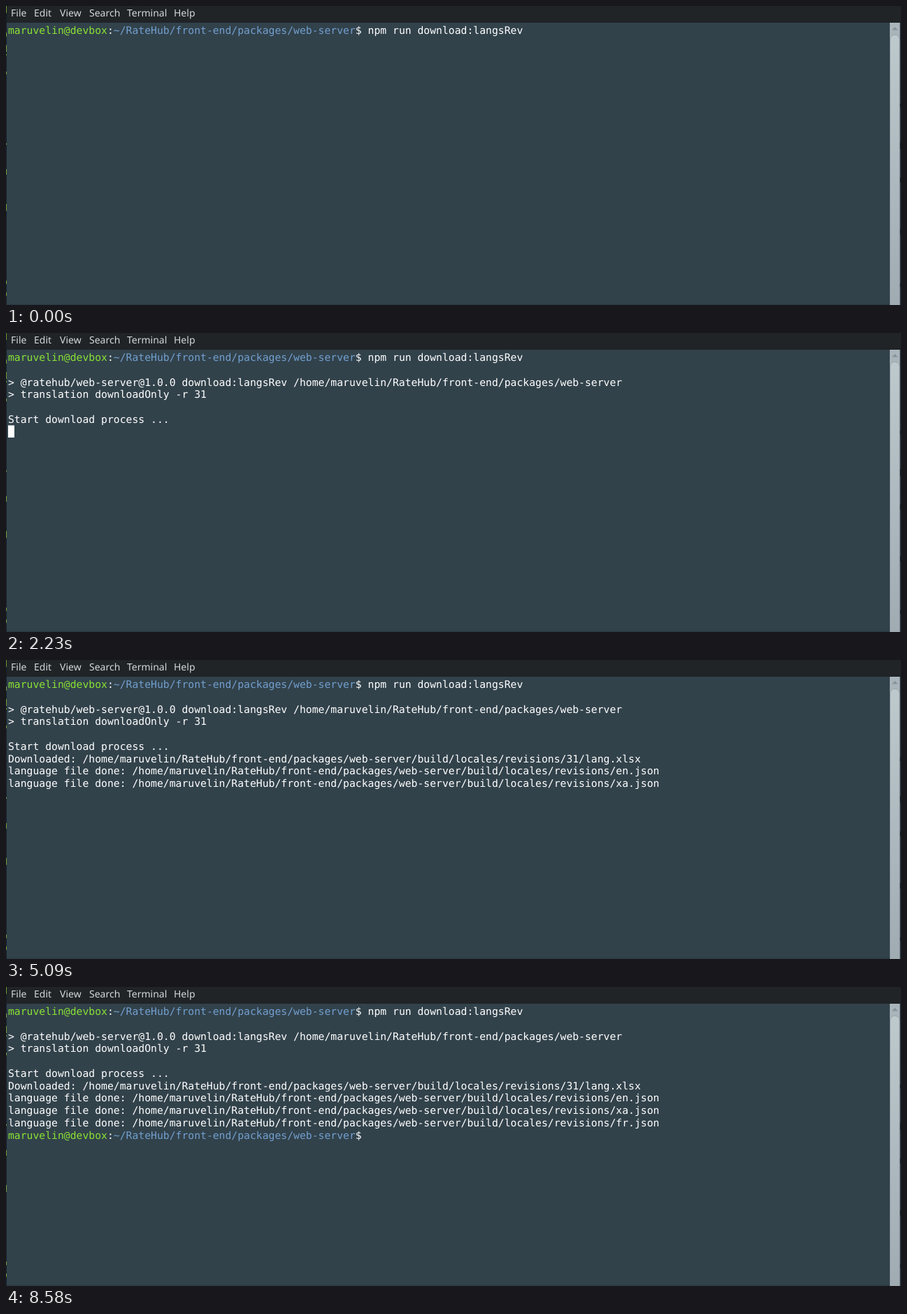
Animation of 1280x429 px, one loop 8900 ms. Source, as an HTML page:

```html
<!DOCTYPE html>
<html lang="en">
<head>
<meta charset="utf-8">
<title>Terminal</title>
<style>
  html, body { margin: 0; width: 100%; height: 100%; overflow: hidden; background: #32424b; }
  svg { display: block; width: 100vw; height: 100vh; }
  text { white-space: pre; text-rendering: geometricPrecision; }
  .menu text { font: 14px "Noto Sans", "Open Sans", sans-serif; fill: #d5d8d9; }
  #screen text { font: 14.74px "DejaVu Sans Mono", monospace; fill: #fff; }
  #screen .user { fill: #8ae234; }
  #screen .path { fill: #729fcf; }
</style>
</head>
<body>
<svg viewBox="0 0 1280 429">
  <defs>
    <linearGradient id="slider" x2="0" y2="1">
      <stop stop-color="#bec9ce"/>
      <stop offset="1" stop-color="#a0abb2"/>
    </linearGradient>
  </defs>
  <rect width="1280" height="429" fill="#32424b"/>
  <rect y="427.5" width="1264" height="1.5" fill="#2b3a42"/>
  <rect width="1280" height="24" fill="#202426"/>
  <g class="menu">
    <text x="7" y="15">File</text>
    <text x="40" y="15">Edit</text>
    <text x="77" y="15">View</text>
    <text x="119" y="15">Search</text>
    <text x="173" y="15">Terminal</text>
    <text x="240" y="15">Help</text>
  </g>

  <!-- scrollbar -->
  <rect x="1264" y="24" width="14.5" height="405" fill="#a9b5bb"/>
  <path d="M1267 34.5l4.3-4.5 4.3 4.5z" fill="#87939a"/>
  <path d="M1264.5 429V48a6.7 6.7 0 0 1 13.4 0V429z" fill="url(#slider)" stroke="#8f9ca3" stroke-width=".8"/>

  <!-- slivers of the window behind -->
  <path d="M.5 0V429M1279.4 24V429" stroke="#15202b"/>
  <path d="M.5 0v10M.5 38v6M.5 56v10M.5 69v2M.5 94v4M.5 197v2M.5 234v8M.5 284v10M.5 394v5M.5 411v5" stroke="#6c9c36"/>
  <path d="M1279.4 140v5M1279.4 195v10M1279.4 246v7M1279.4 320v8M1279.4 398v5" stroke="#05080b"/>

  <g id="screen"></g>
  <rect id="cursor" width="9" height="17.5" fill="#fff"/>
  <g id="pointer" fill="none">
    <path id="beam" d="M-3-8.2h2.2L0-7.4.8-8.2H3M0-7.4V7.4M-3 8.2h2.2L0 7.4.8 8.2H3" stroke="#e8ecee" stroke-width="2.6"/>
    <use href="#beam"/>
    <path d="M-3-8.2h2.2L0-7.4.8-8.2H3M0-7.4V7.4M-3 8.2h2.2L0 7.4.8 8.2H3" stroke="#11181c"/>
  </g>
</svg>
<script>
const LOOP = 8900, LEFT = 3, TOP = 26, CHAR = 8.875, LINE = 17.75;
const USER = 'maruvelin', HOST = 'devbox';
const PROJECT = 'RateHub/front-end/packages/web-server';
const HOME = `/home/${USER}/${PROJECT}`;
const LOCALES = `${HOME}/build/locales/revisions`;
const $ = id => document.getElementById(id);

const prompt = command =>
  `<tspan class="user">${USER}@${HOST}</tspan>:<tspan class="path">~/${PROJECT}</tspan>$ ${command}`;
const done = lang => `language file done: ${LOCALES}/${lang}.json`;

// [time shown, row, content]
const lines = [
  [0, 0, prompt('npm run download:langsRev')],
  [2230, 2, `&gt; @ratehub/web-server@1.0.0 download:langsRev ${HOME}`],
  [2230, 3, '&gt; translation downloadOnly -r 31'],
  [2230, 5, 'Start download process ...'],
  [4630, 6, `Downloaded: ${LOCALES}/31/lang.xlsx`],
  [5090, 7, done('en')],
  [5090, 8, done('xa')],
  [5410, 9, done('fr')],
  [5410, 10, prompt('')]
];
$('screen').innerHTML = lines.map(([, row, content]) =>
  `<text x="${LEFT}" y="${TOP + 14 + row * LINE}">${content}</text>`).join('');
const rows = [...$('screen').children];

// [from, to, column, row] while the block cursor is lit
const cursorSpans = [
  [370, 980, 83, 0], [1590, 2060, 83, 0], [2060, 2230, 0, 1],
  [2230, 2610, 0, 6], [3160, 3770, 0, 6], [4400, 4630, 0, 6], [4630, 5010, 0, 7],
  [5560, 6190, 58, 10], [6800, 7430, 58, 10], [7970, 8580, 58, 10]
];

const exitPath = [
  [985, 133], [1065, 212], [1131, 287], [1168, 343],
  [1186, 379], [1193, 399], [1195, 411], [1195, 422]
];

function pointerAt(t) {
  if (t >= 70 && t < 1990) {
    const step = Math.min(6, Math.floor((t - 70) / 75));
    const rest = (1 - step / 6) ** 2;
    return [933 + 210 * rest, 70 + 354 * rest];
  }
  if (t >= 7120) return exitPath[Math.floor((t - 7120 + 5) / 77.5)];
}

function place(element, position) {
  element.style.display = position ? '' : 'none';
  if (position) element.setAttribute('transform', `translate(${position})`);
}

function draw(now) {
  const t = now % LOOP;
  rows.forEach((row, i) => row.style.display = t >= lines[i][0] ? '' : 'none');
  const span = cursorSpans.find(([from, to]) => t >= from && t < to);
  place($('cursor'), span && [LEFT + span[2] * CHAR, TOP + span[3] * LINE]);
  place($('pointer'), pointerAt(t));
}

const start = performance.now();
function tick() {
  draw(performance.now() - start);
  requestAnimationFrame(tick);
}
tick();
</script>
</body>
</html>
```
